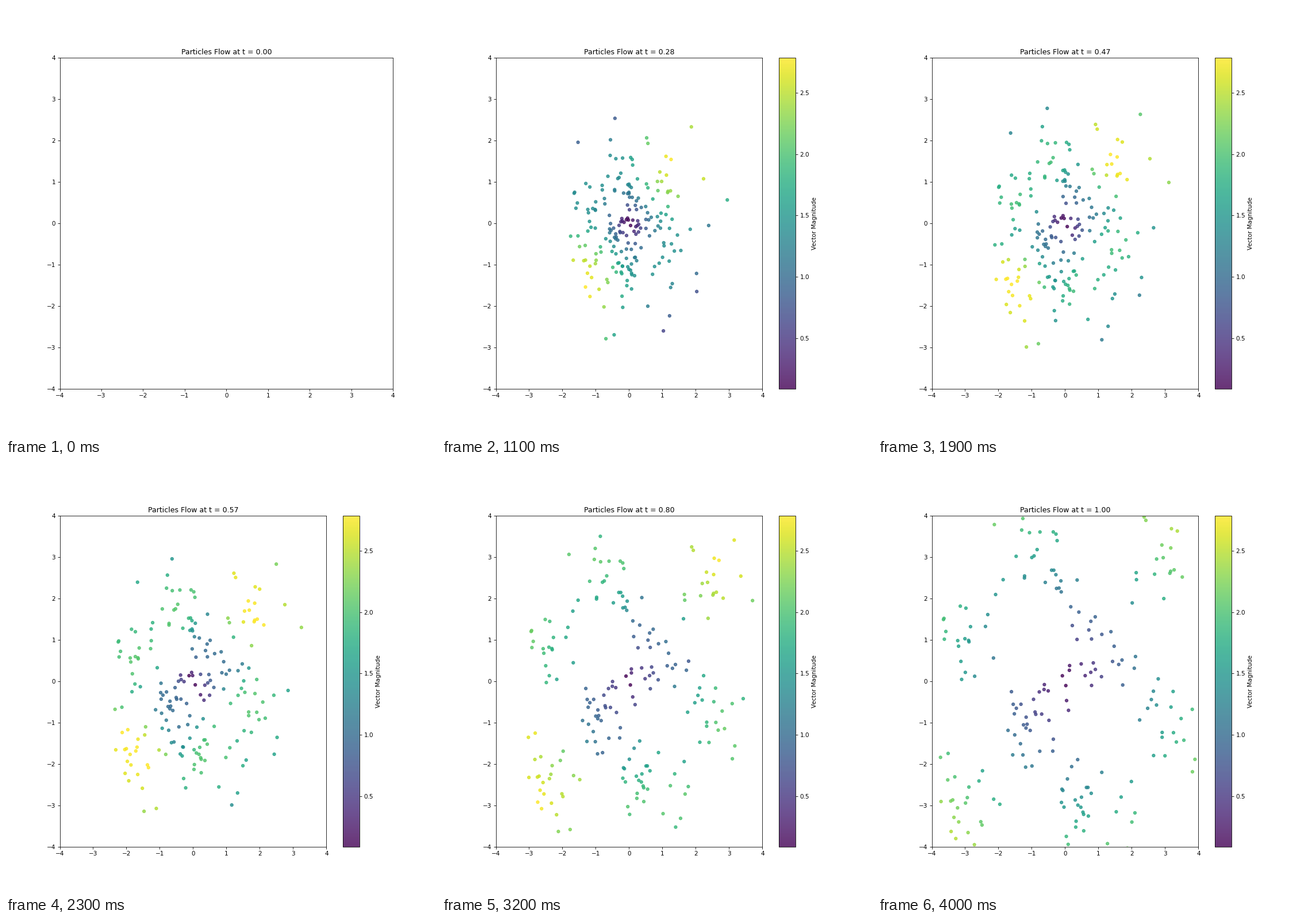
A matplotlib script that plays this animation: 748x748 px, repeating every 4100 ms.

```python
import numpy as np
import matplotlib.pyplot as plt
from matplotlib.animation import FuncAnimation
from matplotlib.cm import ScalarMappable
from matplotlib.colors import Normalize

FRAMES, INTERVAL = 41, 100
START = 4           # step at which the particle cloud is described
COUNT = 200
SPREAD = (0.92, 1.0)
SOFT = 0.25         # softness of the checkerboard edges
ALPHA = 0.8
WIDE = [0.125, 0.11, 0.775, 0.77]
NARROW = [0.125, 0.11, 0.62, 0.77]
BAR = [0.78375, 0.11, 0.0385, 0.77]

# The few particles that start far from the crowd
FAR = [(-0.48, 2.56), (1.76, 2.27), (-1.56, 1.98), (2.19, 0.94),
       (3.0, 0.43), (2.39, -0.13), (2.04, -1.24), (2.07, -1.69),
       (1.25, -2.27), (1.08, -2.66), (-0.33, -2.72), (-0.56, -2.82)]

# Four intervals per axis, each sampled at eight midpoints
NODES = (np.arange(32) + 0.5) / 4 - 4
BOARD = (np.add.outer(np.arange(4), np.arange(4)) % 2 == 0).astype(float)


def make_cloud(radius=2.1):
    rng = np.random.default_rng(7)
    pts = rng.normal(0, SPREAD, (COUNT * 2, 2))
    pts = pts[np.hypot(*pts.T) < radius]
    return np.vstack([FAR, pts[:COUNT - len(FAR)]])


def cell_moments(x, t, var):
    """Mass and first moment of each interval, as seen from x."""
    power = -(x[:, None] - t * NODES) ** 2 / (2 * var)
    w = np.exp(power - power.max(axis=1, keepdims=True))
    return [a.reshape(-1, 4, 8).sum(axis=2) for a in (w, w * NODES)]


def velocity(p, t):
    """Flow that carries a unit normal cloud onto the checkerboard."""
    var = (1 - t) ** 2 + (t * SOFT) ** 2
    mass_x, mom_x = cell_moments(p[:, 0], t, var)
    mass_y, mom_y = cell_moments(p[:, 1], t, var)

    def joint(a, b):
        return np.einsum("ni,ij,nj->n", a, BOARD, b)

    goal = np.stack([joint(mom_x, mass_y), joint(mass_x, mom_y)], axis=1)
    goal /= joint(mass_x, mass_y)[:, None] + 1e-300
    return goal + (t * SOFT ** 2 - (1 - t)) / var * (p - t * goal)


def step(p, t, h):
    a = velocity(p, t)
    b = velocity(p + h / 2 * a, t + h / 2)
    c = velocity(p + h / 2 * b, t + h / 2)
    d = velocity(p + h * c, t + h)
    return p + h / 6 * (a + 2 * b + 2 * c + d)


def trace():
    dt = 1 / (FRAMES - 1)
    path = {START: make_cloud()}
    for i in range(START, 0, -1):
        path[i - 1] = step(path[i], i * dt, -dt)
    for i in range(START, FRAMES - 1):
        path[i + 1] = step(path[i], i * dt, dt)
    return path


path = trace()

fig = plt.figure(figsize=(10, 10), dpi=74.8)
ax = fig.add_axes(WIDE)
ax.set(xlim=(-4, 4), ylim=(-4, 4))
title = ax.set_title("")
dots = ax.scatter(*path[0].T, c=np.zeros(COUNT), s=25,
                  cmap="viridis", alpha=ALPHA)
cax = fig.add_axes(BAR)
fig.colorbar(ScalarMappable(Normalize(0.088, 2.786), "viridis"),
             cax=cax, alpha=ALPHA, label="Vector Magnitude")


def update(i):
    t = i / (FRAMES - 1)
    started = i > 0
    ax.set_position(NARROW if started else WIDE)
    cax.set_visible(started)
    dots.set_visible(started)
    title.set_text(f"Particles Flow at t = {t:.2f}")
    # Each step spans the whole colour range anew
    speed = np.hypot(*velocity(path[i], t).T)
    dots.set_offsets(path[i])
    dots.set_array(speed)
    dots.set_clim(speed.min(), speed.max())
    return dots, title


anim = FuncAnimation(fig, update, frames=FRAMES, interval=INTERVAL,
                     init_func=lambda: update(0), repeat=True, repeat_delay=0)
plt.show()
```
